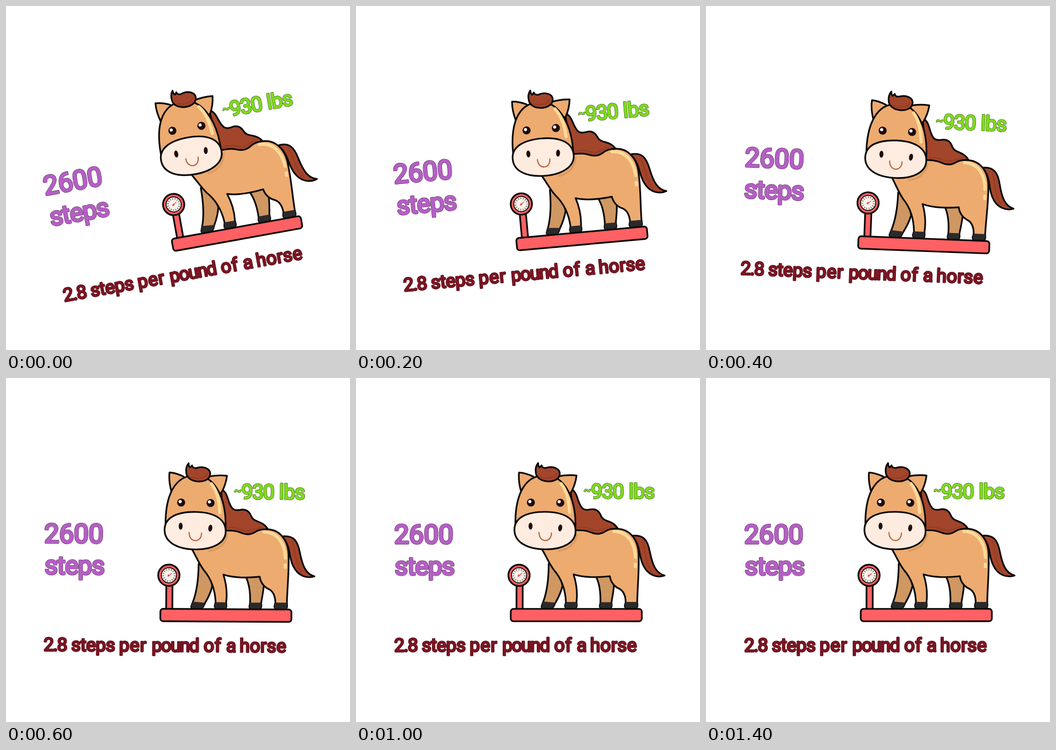
Write an HTML page that moves like this. It is 748 px wide and 748 px high and loops after 1.5 s.

```html
<!DOCTYPE html>
<html lang="en">
<head>
<meta charset="utf-8">
<title>Steps per pound</title>
<style>
  html, body { margin: 0; width: 100%; height: 100%; overflow: hidden; background: #fff; }
  svg { display: block; width: 100vw; height: 100vh; }
  text { font-family: Roboto, sans-serif; font-weight: 400; stroke-linejoin: round; }
  .line { stroke: #0c0a0a; stroke-width: 3.7; stroke-linejoin: round; stroke-linecap: round; }
  .coat { fill: #edab70; }
  .far { fill: #cf9762; }
  .hair { fill: #a3452a; }
  .hoof { fill: #2b2a2b; }
  .red { fill: #ff6063; }
  .shine { fill: none; stroke: #fcda97; stroke-width: 7; stroke-linecap: round; }
  .shade { fill: none; stroke: #8c3824; stroke-width: 3; stroke-linecap: round; opacity: .55; }
</style>
</head>
<body>
<svg viewBox="0 0 748 748">
  <g id="scene">
    <g id="scale">
      <rect class="red line" x="349" y="448" width="13.5" height="56"/>
      <rect class="red line" x="336.5" y="502" width="285" height="27" rx="6"/>
      <circle class="red line" cx="354.5" cy="429" r="23.2"/>
      <circle cx="354.5" cy="429" r="16.5" fill="#fdf3ec" stroke="#0c0a0a" stroke-width="2"/>
      <g id="ticks" stroke="#3a2a2a" stroke-width="1.1"></g>
      <path d="M352 431.500L360.500 425" stroke="#f4484b" stroke-width="1.600" stroke-linecap="round"/>
      <circle cx="354" cy="429.500" r="2.200" fill="#f4484b"/>
    </g>

    <g id="horse">
      <path class="hair line" d="M600 343C625 340 634 352 639 378C645 408 653 425 671 429.500C655 435 635 429 625 408C615 389 619 370 606 350Z"/>
      <path class="shade" d="M622 353C630 372 628 403 643 420"/>

      <path class="far line" d="M419 404C419 435 416 463 407 487L404 495Q402 500 408 500L424 500Q429 500 431 494L434 488C441 476 446 465 449 452L440 410Z"/>
      <path class="hoof" d="M407 486L434 488.500L430 496Q428 500 424 500L408 500Q402 500 404 495Z"/>
      <path class="far line" d="M522 432C530 448 532 468 531.500 488L530 496Q530 500 535 500L551 500Q556 500 556 495L555.500 488C558 472 561 460 561 446L552 428Z"/>
      <path class="hoof" d="M531.500 487.500H555.500L556 495Q556 500 551 500H535Q530 500 530 496Z"/>

      <path class="coat line" d="M403 370C413 386 419 402 430 417C445 434 455 456 456.500 487L454.500 495Q454.500 500 459 500H475Q480 500 480 495L479.500 487C482 465 479 445 473 427C495 434 525 434 552 431C554 445 563 454 572 458C582 463 586 474 586.500 487L584.500 495Q584.500 500 589 500H607Q612 500 612 495L611.500 487C612 455 616 420 614.500 382C613 350 594 327 566 328L520 328L470 290Z"/>
      <path class="hoof" d="M456.500 487H479.500L480 495Q480 500 475 500H459Q454.500 500 454.500 495Z"/>
      <path class="hoof" d="M586.500 487H611.500L612 495Q612 500 607 500H589Q584.500 500 584.500 495Z"/>
      <path class="shine" d="M561 333.500C588 334 606 355 607.500 390M607.500 405V410"/>
      <path d="M440 376C463 373 478 360 481 338" fill="none" stroke="#d79a60" stroke-width="4"/>

      <path class="hair line" d="M466 240C481 248 480 261 486 273C491 285 496 288 508 286C521 283 528 289 532 298C538 315 556 307 569 327C558 328 551 328 543 333C531 341 521 340 509 335C499 331 490 331 478 331C472 305 470 270 466 240Z"/>
      <path class="shade" d="M482 325C500 322 511 330 525 332C536 331 543 325 557 323"/>

      <path class="coat line" d="M359 247C355 233 353 219 354.500 205.500C364 206 374 209 385 214L400 235L375 260Z"/>
      <path class="coat line" d="M439 214C453 211 466 210.500 479.500 212C478 225 474 237 468 248L450 260L425 235Z"/>
      <path class="coat line" d="M347 332C343 254 367 211.500 411 211.500C454 211.500 480 262 477 332Z"/>
      <path class="shine" d="M446 230C457 243 463.500 266 464.500 292"/>
      <path class="line" fill="#fdecdf" d="M344.500 330C344.500 303 372 291 411 291C450 291 477.500 305 477.500 333C477.500 358 450 372.500 413 372.500C372 372.500 344.500 357 344.500 330Z"/>
      <g fill="#200b0c">
        <circle cx="380.200" cy="270.700" r="8.800"/>
        <circle cx="444.200" cy="271.300" r="8.800"/>
        <ellipse cx="379.500" cy="322" rx="4.300" ry="7.600"/>
        <ellipse cx="444" cy="326" rx="4.300" ry="7.600" transform="rotate(8 444 326)"/>
      </g>
      <g fill="#fff">
        <circle cx="378" cy="268.700" r="3.400"/>
        <circle cx="441.700" cy="268.900" r="3.400"/>
      </g>
      <path d="M398 336C398 359 425 359 425 337" fill="none" stroke="#c1663a" stroke-width="2.600" stroke-linecap="round"/>
      <path class="hair line" d="M391 206C389.500 197 392 190 396 185C396 190 397 193 399.500 194.500L403.500 190C404 194 408 196 413 195.500C430 190 444 198 443 209C442 222 425 227 411 224C400 222 392 215 391 206Z"/>
      <path class="shade" d="M402 215C415 221 431 218 437 208"/>
    </g>

    <g id="labels"></g>
  </g>
</svg>

<script>
const NS = 'http://www.w3.org/2000/svg';
const byId = id => document.getElementById(id);

function add(parent, tag, attrs, content = '') {
  const el = document.createElementNS(NS, tag);
  for (const k in attrs) el.setAttribute(k, attrs[k]);
  el.textContent = content;
  parent.append(el);
}

for (let a = 0; a < 360; a += 24) {
  add(byId('ticks'), 'path', { d: 'M0-14.500V-10.500', transform: `translate(354.5 429) rotate(${a})` });
}

// Each word: text, left edge, letter spacing. Round strokes soften the letters.
function label(color, size, y, weight, words) {
  for (const [str, x, gap] of words) {
    const base = { x, y, 'font-size': size, 'letter-spacing': gap };
    add(byId('labels'), 'text', { ...base, fill: 'none', stroke: '#2a1526', 'stroke-width': weight + 1, 'aria-hidden': true }, str);
    add(byId('labels'), 'text', { ...base, fill: color, stroke: color, 'stroke-width': weight }, str);
  }
}

label('#b55fc5', 58, 360, 3.2, [['2600', 83, -0.5]]);
label('#b55fc5', 56, 428, 3.2, [['steps', 84, -1.5]]);
label('#7ddb1c', 24, 252, 1.6, [['~', 495, 0]]);
label('#7ddb1c', 45, 262, 2.4, [['930', 511, -1.8], ['lbs', 593, -1.2]]);
label('#7d1420', 40, 595, 2.6, [
  ['2.8', 83, -1.8], ['steps', 143, -0.6], ['per', 247, 1], ['pound', 318, -2],
  ['of', 431, 1], ['a', 480, 0], ['horse', 509, 0.3]
]);

// Damped swing about the stage centre, advanced in 100 ms steps.
const LOOP = 1500, STEP = 100;
const DECAY = 0.5045, TURN = 128.8 * Math.PI / 180;

function angle(n) {
  return Math.exp(-DECAY * n) * (16.8 * Math.sin(TURN * n) - 10.2 * Math.cos(TURN * n));
}

const start = performance.now();
function draw() {
  const t = Math.max(0, performance.now() - start) % LOOP;
  byId('scene').setAttribute('transform', `rotate(${angle(Math.floor(t / STEP)).toFixed(3)} 374 374)`);
  requestAnimationFrame(draw);
}
draw();
</script>
</body>
</html>
```
